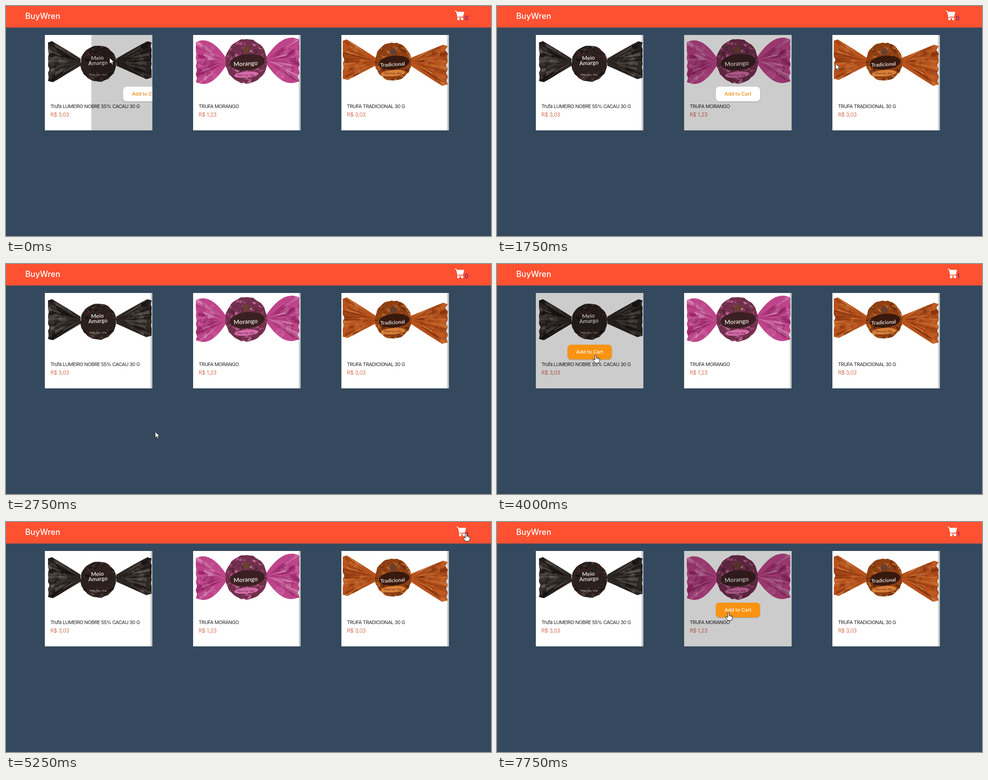
Animation, 1086 px wide and 516 px high, one loop 8 s. Source, as an HTML page with a canvas:

```html
<!DOCTYPE html>
<html lang="pt">
<head>
<meta charset="utf-8">
<title>Loja</title>
<style>
  html, body { margin: 0; width: 100%; height: 100%; overflow: hidden; background: #34495e; }
  canvas { display: block; }
</style>
</head>
<body>
<canvas id="stage" width="1086" height="516"></canvas>
<script>
const W = 1086, H = 516, STEP = 250, TICKS = 32, CLICK = 16;
const CARD = { y: 65, w: 240.6, h: 214, rest: 236.6 };
const BUTTON = { x: 71, y: 181, w: 99, h: 33 };
const ORANGE = [249, 147, 18];

// Stops of the mouse: tick, x, y.
const route = [
  [0, 232, 116], [2, 250, 140], [6, 640, 130], [7, 758, 129], [8, 800, 150], [10, 690, 260],
  [11, 334, 376], [13, 221, 204], [16, 221, 204], [19, 1026, 22], [21, 1030, 25],
  [23, 580, 172], [24, 560, 195], [25, 631, 153], [28, 520, 205], [31, 518, 203]
];

// Wings: pinch x, pinch y, outer x, top, bottom. Tones and foil run from dark to light.
const products = [
  {
    x: 87, title: 'Trufa LUMEIRO NOBRE 55% CACAU 30 G', price: 'R$ 3,03',
    wings: [[167, 126, 94, 79, 171], [247, 126, 326, 79, 164]], bulge: .62, ball: [207, 129, 40, 41],
    tones: ['#120e0d', '#2e2825', '#82766d'], foil: ['#0f0c0b', '#2a211f', '#5a4e49', '#4a211d'],
    label: '#2a201e', words: ['Meio', 'Amargo'], size: 12.5
  },
  {
    x: 419, title: 'TRUFA MORANGO', price: 'R$ 1,23',
    wings: [[493, 125, 425, 78, 174], [583, 122, 657, 72, 172]], bulge: 1.15, ball: [538, 124, 47, 50],
    tones: ['#8f1c5e', '#bf458b', '#e5a6cb'], foil: ['#43202b', '#71304c', '#c9529a', '#dd86b8'],
    label: '#3a2023', words: ['Morango'], size: 13.5, patch: '#d26aa8'
  },
  {
    x: 751, title: 'TRUFA TRADICIONAL 30 G', price: 'R$ 3,03',
    wings: [[829, 125, 754, 75, 166], [905, 125, 989, 87, 179]], bulge: .62, ball: [867, 125, 41, 43],
    tones: ['#7d2c0c', '#b8531c', '#e39a55'], foil: ['#4b210d', '#8e3f13', '#c96b24', '#e79850'],
    label: '#38190e', words: ['Tradicional'], size: 11.5, patch: '#d98136'
  }
];

const ctx = document.getElementById('stage').getContext('2d');

function randomizer(seed) {
  return () => (seed = (seed * 16807) % 2147483647) / 2147483647;
}

function mouseAt(tick) {
  const next = route.findIndex(stop => stop[0] > tick);
  if (next < 0) return route[route.length - 1].slice(1);
  const [t0, x0, y0] = route[next - 1], [t1, x1, y1] = route[next], k = (tick - t0) / (t1 - t0);
  return [x0 + (x1 - x0) * k, y0 + (y1 - y0) * k];
}

const inside = ([px, py], x, y, w, h) => px > x && px < x + w && py > y && py < y + h;
const overCard = (mouse, p) => inside(mouse, p.x, CARD.y, CARD.w, CARD.h);
const overButton = (mouse, p) => inside(mouse, p.x + BUTTON.x, BUTTON.y, BUTTON.w, BUTTON.h);
const approach = (v, on, step) => Math.max(0, Math.min(1, v + (on ? step : -step)));

// Hover transitions follow from the mouse route, one state per tick.
function buildTimeline() {
  let cards = products.map((p, i) => ({ cover: i ? 0 : .56, heat: 0 }));
  return Array.from({ length: TICKS }, (_, tick) => {
    const mouse = mouseAt(tick), state = { mouse, cards };
    state.pointing = inside(mouse, 1005, 0, 40, 48) ||
      products.some((p, i) => overButton(mouse, p) && cards[i].cover > .4);
    cards = cards.map(({ cover, heat }, i) => ({
      cover: approach(cover, overCard(mouse, products[i]), .5),
      heat: approach(heat, overButton(mouse, products[i]), .35)
    }));
    return state;
  });
}

function text(g, string, x, y, font, color, align = 'left', spacing = 0) {
  g.font = font;
  g.fillStyle = color;
  g.textAlign = align;
  g.letterSpacing = spacing + 'px';
  g.fillText(string, x, y);
}

function ellipse(g, x, y, rx, ry, color, tilt = 0) {
  g.fillStyle = color;
  g.beginPath();
  g.ellipse(x, y, rx, ry, tilt, 0, Math.PI * 2);
  g.fill();
}

function wing(g, [px, py, edge, top, bottom], bulge, tones, rnd) {
  const reach = edge - px, teeth = 10;
  const bend = y => py + (y - py) * bulge;
  g.save();
  g.beginPath();
  g.moveTo(px, py - 8);
  g.quadraticCurveTo(px + reach * .45, bend(top), edge - reach * .12, top);
  for (let i = 0; i <= teeth; i++) {
    g.lineTo(edge - reach * (i % 2 ? .06 * rnd() : 0), top + 3 + (bottom - top - 6) * i / teeth);
  }
  g.lineTo(edge - reach * .15, bottom);
  g.quadraticCurveTo(px + reach * .45, bend(bottom), px, py + 8);
  g.fillStyle = tones[1];
  g.fill();
  g.clip();
  // Pleats spread from the pinch and break up towards the edge.
  for (let i = 0; i < 90; i++) {
    const near = rnd() * .6, far = near + .2 + rnd() * .5, slope = (rnd() - .5) * 110;
    const at = (k, s) => g.lineTo(px + reach * k, py + (slope + s) * k);
    g.globalAlpha = .2 + rnd() * .35;
    g.fillStyle = tones[i % 5 < 3 ? 0 : i % 5 - 2];
    g.beginPath();
    at(near, 0);
    at(far, rnd() * 9);
    at(far, -rnd() * 5);
    g.fill();
  }
  g.strokeStyle = tones[2];
  g.lineWidth = .8;
  g.globalAlpha = .6;
  for (let i = 0; i < 8; i++) {
    const x = px + reach * (.35 + rnd() * .6), y = py + (rnd() - .5) * 76, turn = rnd() * 6;
    for (let r = 3; r < 11; r += 3) {
      g.beginPath();
      g.arc(x, y, r, turn, turn + 4);
      g.stroke();
    }
  }
  g.restore();
}

function candy(g, p, rnd) {
  const [cx, cy, rx, ry] = p.ball;
  for (const w of p.wings) wing(g, w, p.bulge, p.tones, rnd);
  g.save();
  g.beginPath();
  for (let a = 0; a < 6.28; a += .14) {
    const r = .97 + rnd() * .05;
    g.lineTo(cx + Math.cos(a) * rx * r, cy + Math.sin(a) * ry * r);
  }
  g.fillStyle = p.foil[1];
  g.fill();
  g.clip();
  for (let i = 0; i < 170; i++) {
    const a = rnd() * 6.283, d = .45 + rnd() * .6;
    const x = cx + Math.cos(a) * rx * d, y = cy + Math.sin(a) * ry * d;
    g.globalAlpha = .35 + rnd() * .45;
    g.fillStyle = p.foil[Math.floor(rnd() * 4)];
    g.beginPath();
    for (let j = 0; j < 3; j++) g.lineTo(x + (rnd() - .5) * 18, y + (rnd() - .5) * 13);
    g.fill();
  }
  g.globalAlpha = 1;
  ellipse(g, cx + 2, cy + 2, rx * .84, ry * .36, p.label, -.1);
  if (p.patch) {
    ellipse(g, cx, cy + ry * .6, 27, 7, p.patch, -.08);
    ellipse(g, cx, cy - ry * .52, 8, 8, '#67402f');
  }
  g.restore();
  p.words.forEach((word, i) => {
    g.save();
    g.translate(cx - 2 + i, cy + (p.words.length > 1 ? -8 : 11) + i * 11);
    if (p.words.length === 1) g.translate(1, -1);
    g.rotate(-.06);
    text(g, word, 0, 0, `600 ${p.size}px Lato, sans-serif`, '#f3e9e4', 'center');
    g.restore();
  });
  text(g, 'Peso Líq. 30g', cx - 1, cy + ry * .65, '6.5px Lato, sans-serif',
    p.patch ? '#5a2430' : '#cfc5c0', 'center');
}

function paintPage() {
  const page = document.createElement('canvas');
  page.width = W;
  page.height = H;
  const g = page.getContext('2d');
  g.fillStyle = '#34495e';
  g.fillRect(0, 0, W, H);
  g.fillStyle = '#fd5131';
  g.fillRect(0, 0, W, 48.3);
  text(g, 'BuyWren', 43, 29, '500 18px Inter, sans-serif', '#fff');
  products.forEach((p, i) => {
    g.fillStyle = '#fff';
    g.fillRect(p.x, CARD.y, CARD.w, CARD.h);
    candy(g, p, randomizer(4177 + i * 911));
    text(g, p.title, p.x + 12.5, 229, '11px Inter, sans-serif', '#222', 'left', -.5);
    text(g, p.price, p.x + 12.5, 248, '300 12px Inter, sans-serif', '#c8451f', 'left', -.2);
  });
  return page;
}

function drawOverlay(p, { cover, heat }) {
  const left = p.x + CARD.rest * (1 - cover);
  ctx.save();
  ctx.beginPath();
  ctx.rect(p.x, CARD.y, CARD.w, CARD.h);
  ctx.clip();
  ctx.fillStyle = 'rgba(0,0,0,.2)';
  ctx.fillRect(left, CARD.y, CARD.w, CARD.h);
  ctx.shadowColor = 'rgba(0,0,0,.25)';
  ctx.shadowBlur = 2;
  ctx.shadowOffsetY = 1;
  ctx.fillStyle = `rgb(${ORANGE.map(c => 255 + (c - 255) * heat)})`;
  ctx.beginPath();
  ctx.roundRect(left + BUTTON.x, BUTTON.y, BUTTON.w, BUTTON.h, 8);
  ctx.fill();
  ctx.shadowColor = 'transparent';
  text(ctx, 'Add to Cart', left + BUTTON.x + BUTTON.w / 2, 201, '500 11px Inter, sans-serif',
    heat > .5 ? '#fff' : '#e8890c', 'center');
  ctx.restore();
}

const basket = new Path2D('M0 0L4 1L5 3H21L18.5 14H7.5L8.2 16H18.5V17.5H6.5L2.8 2.5L0 1.5Z');
function drawCart(count) {
  ctx.save();
  ctx.translate(count ? 1009 : 1005, 10);
  ctx.fillStyle = '#fff';
  ctx.fill(basket);
  for (const x of [8, 16.5]) ellipse(ctx, x, 19.2, 2.7, 2.7, '#fff');
  ctx.restore();
  text(ctx, String(count), 1035.5, 32, '13px Inter, sans-serif', '#4a1a8b', 'right');
}

const arrow = new Path2D('M0 0V14L3.3 11L5.7 16L8 15L5.8 10.2H10Z');
const hand = new Path2D('M-1.7 1Q0-1 1.7 1V6Q3.5 5 4.5 6.7Q6.3 6 7 7.6Q9 7.4 9 9.5V13L7 18H-1.5L-6 11.5Q-6.5 9-4 9.5L-1.7 11.5Z');
const fingers = new Path2D('M1.7 6V9M4.5 7V9.5M7 8V10');
function drawCursor([x, y], pointing) {
  const shape = pointing ? hand : arrow;
  ctx.save();
  ctx.translate(x, y);
  ctx.fillStyle = '#fff';
  ctx.strokeStyle = '#111';
  ctx.fill(shape);
  ctx.stroke(shape);
  if (pointing) ctx.stroke(fingers);
  ctx.restore();
}

const page = paintPage(), timeline = buildTimeline();

function frame() {
  const tick = Math.floor(performance.now() / STEP) % TICKS, { mouse, cards, pointing } = timeline[tick];
  ctx.drawImage(page, 0, 0);
  products.forEach((p, i) => drawOverlay(p, cards[i]));
  drawCart(tick < CLICK ? 0 : 1);
  drawCursor(mouse, pointing);
  requestAnimationFrame(frame);
}
frame();
</script>
</body>
</html>
```
